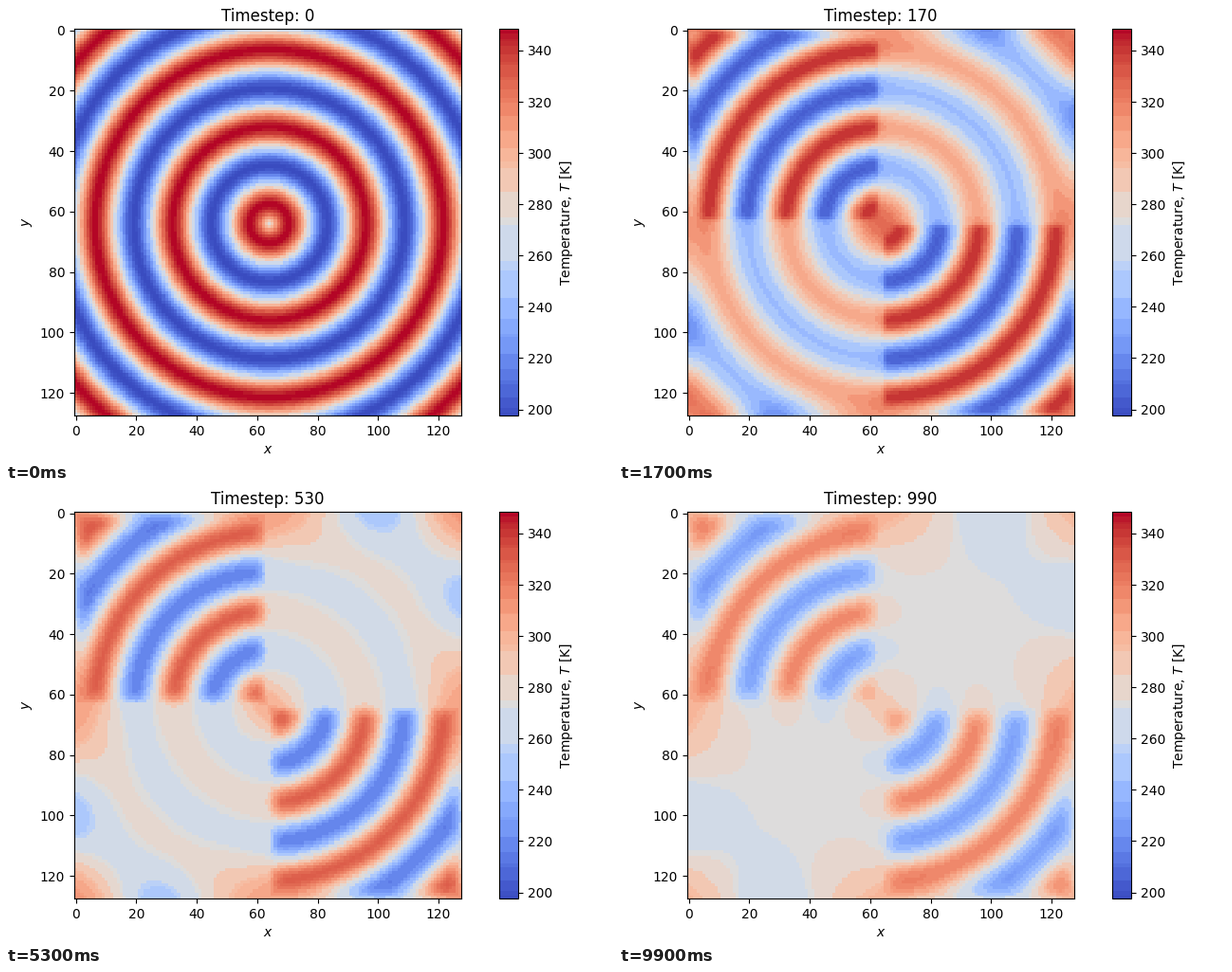
Write a matplotlib script that moves like this. It is 640 px wide and 480 px high and loops after 10 s.

```python
import numpy as np
import matplotlib.pyplot as plt
from matplotlib.animation import FuncAnimation
from matplotlib.cm import ScalarMappable
from matplotlib.colors import ListedColormap, Normalize

N = 128
FRAMES, STRIDE = 100, 10
MEAN, AMP = 273.05, 75.45
SLOW, FAST = 0.009, 0.09

W, H, DPI = 640, 480, 100
BAR_WEIGHT = 3  # share of the colour bar in each band's mean colour

y, x = np.mgrid[:N, :N]
start = MEAN + AMP * np.sin(10 * np.pi * np.hypot(x - N / 2, y - N / 2) / N)

# checkerboard of slow and fast quadrants
alpha = np.where((x < N // 2) == (y < N // 2), SLOW, FAST)
faces = [(alpha + np.roll(alpha, -1, axis)) / 2 for axis in (0, 1)]


def diffuse(T):
    """One explicit step of div(alpha grad T) on a periodic grid."""
    change = np.zeros_like(T)
    for axis, face in enumerate(faces):
        flux = face * (np.roll(T, -1, axis) - T)
        change += flux - np.roll(flux, 1, axis)
    return T + change


def simulate():
    T, out = start, []
    for _ in range(FRAMES):
        out.append(T)
        for _ in range(STRIDE):
            T = diffuse(T)
    return out


norm = Normalize(MEAN - AMP, MEAN + AMP)
base = plt.get_cmap("coolwarm")(np.arange(256))[:, :3]
r, g, b = (base * 255).round().astype(int).T
_, band = np.unique((r // 32) * 256 + (g // 16) * 16 + b // 32,
                    return_inverse=True)


def levels(T):
    return np.clip(norm(T).data * 256, 0, 255).astype(int)


def banded(idx):
    """Colour table with flat bands, each the mean of the shades in use."""
    weight = np.bincount(idx.ravel(), minlength=256) + BAR_WEIGHT
    total = np.bincount(band, weight)
    mean = [np.bincount(band, weight * c) / total for c in base.T]
    return np.stack(mean, axis=1)[band]


def picture(T):
    idx = levels(T)
    return banded(idx)[idx]


fields = simulate()


def box(left, top, width, height):
    return [left / W, 1 - (top + height) / H, width / W, height / H]


fig = plt.figure(figsize=(W / DPI, H / DPI), dpi=DPI)
ax = fig.add_axes(box(72, 24, 408, 408))
image = ax.imshow(picture(fields[0]), interpolation="nearest")
ax.set_xlabel("$x$")
ax.set_ylabel("$y$")
title = ax.set_title("Timestep: 0")

cax = fig.add_axes(box(520, 24, 20.4, 408))
cmap = ListedColormap(banded(levels(fields[0])))
fig.colorbar(ScalarMappable(norm, cmap), cax=cax,
             label="Temperature, $T$ [K]")


def update(i):
    image.set_data(picture(fields[i]))
    title.set_text(f"Timestep: {i * STRIDE}")
    return image, title


anim = FuncAnimation(fig, update, frames=FRAMES, interval=100,
                     repeat=True, repeat_delay=0)
plt.show()
```
